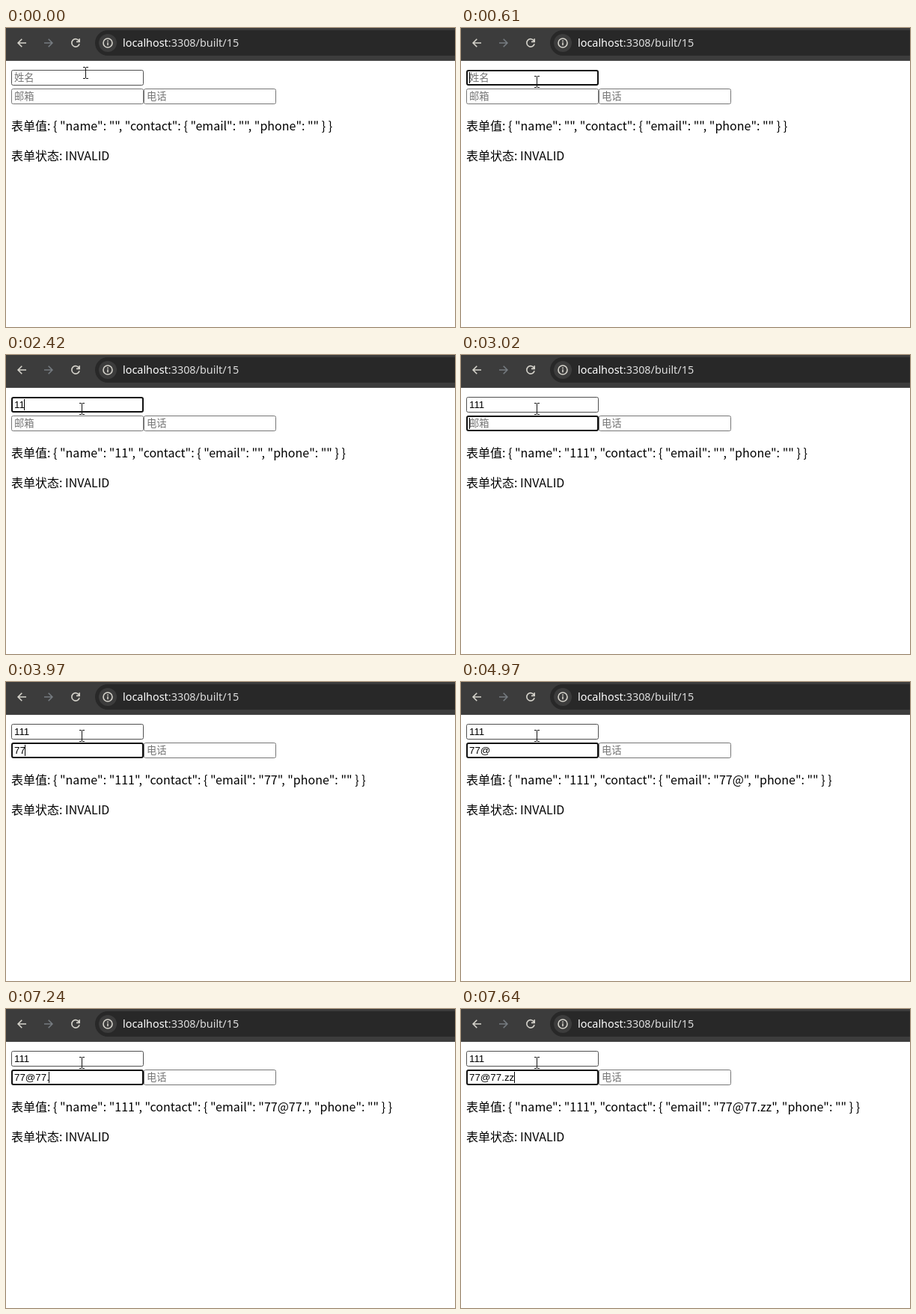
These frames come from a looping animation (600x400 px, 8000 ms). An HTML page:

```html
<!DOCTYPE html>
<html lang="en">
<head>
<meta charset="utf-8">
<title>表单</title>
<style>
  html, body { margin: 0; width: 100%; height: 100%; overflow: hidden; background: #fff; }
  svg { display: block; }
  text { font-kerning: normal; text-rendering: optimizeLegibility; }
  .url { font: 14.4px "Noto Sans", "Open Sans", sans-serif; fill: #dedede; }
  .url .host { fill: #fff; }
  .page { font: 16px "Noto Sans CJK SC", "Noto Sans CJK", sans-serif; fill: #000; }
  .value { font: 13.333px "Liberation Sans", Arial, "Noto Sans CJK SC", sans-serif; fill: #000; }
  .hint { font: 13.333px "Noto Sans CJK SC", "Noto Sans CJK", sans-serif; fill: #757575; }
  .icon { fill: none; stroke: #d5d3cb; stroke-width: 1.6; }
  .icon .dim { stroke: #757b80; }
</style>
</head>
<body>
<svg width="600" height="400" viewBox="0 0 600 400">
  <rect width="600" height="44" fill="#3c3c3c"/>
  <rect y="43" width="600" height="1" fill="#484848"/>
  <rect x="119" y="3" width="520" height="34" rx="17" fill="#282828"/>
  <circle cx="136" cy="20" r="12" fill="#3c3c3c"/>
  <g class="icon">
    <path d="M27 20H16.5M21.3 14.8L16.1 20l5.2 5.2"/>
    <path class="dim" d="M51 20h10.5M56.7 14.8l5.2 5.2-5.2 5.2"/>
    <path d="M97.6 17.3A5.2 5.2 0 1 0 98.1 21.2M98.2 14.2v4.2h-4.2"/>
    <circle cx="136" cy="20" r="6"/>
    <path d="M136 19.2v4M136 16.6v1.6"/>
  </g>
  <text class="url" x="156" y="25"><tspan class="host">localhost</tspan>:3308/built/15</text>

  <g id="fields"></g>
  <rect id="caret" width="1" height="15" fill="#000"/>
  <text id="json" class="page" x="7" y="137"></text>
  <text class="page" x="7" y="177">表单状态: INVALID</text>
  <path id="pointer" fill="none" stroke="#111" d="M103 52.5h3m1 0h3M106.5 53v14M103 67.5h3m1 0h3"/>
</svg>
<script>
const LOOP = 8000, BLINK = 535;
const byId = id => document.getElementById(id);

function setAttrs(node, attrs) {
  for (const key in attrs) node.setAttribute(key, attrs[key]);
  return node;
}

function add(parent, tag, attrs) {
  const node = document.createElementNS("http://www.w3.org/2000/svg", tag);
  return parent.appendChild(setAttrs(node, attrs));
}

function makeField(x, y, hint, border) {
  const group = byId("fields");
  return {
    x, y, hint, border,
    box: add(group, "rect", { fill: "#fff", rx: 2 }),
    text: add(group, "text", { x: x + 4, y: y + 15 })
  };
}

const fields = {
  name: makeField(7, 56, "姓名", "#4f4f4f"),
  email: makeField(7, 81, "邮箱", "#767676"),
  phone: makeField(184, 81, "电话", "#767676")
};

// Each entry: time, focused field, key typed.
const events = [
  [540, "name", ""], [2220, "name", "1"], [2420, "name", "1"], [2690, "name", "1"],
  [3020, "email", ""], [3760, "email", "7"], [3970, "email", "7"], [4430, "email", "@"],
  [5370, "email", "7"], [5510, "email", "7"], [6170, "email", "."],
  [7440, "email", "z"], [7640, "email", "z"]
];

function stateAt(t) {
  const state = { name: "", email: "", phone: "", focus: null, since: 0 };
  for (const [time, field, key] of events) {
    if (time > t) break;
    state[field] += key;
    state.focus = field;
    state.since = time;
  }
  return state;
}

function drawField(field, value, focused) {
  const inset = focused ? 1 : 0.5;
  setAttrs(field.box, {
    x: field.x + inset, y: field.y + inset,
    width: 177 - 2 * inset, height: 21 - 2 * inset,
    stroke: focused ? "#101010" : field.border,
    "stroke-width": 2 * inset
  });
  field.text.setAttribute("class", value ? "value" : "hint");
  field.text.textContent = value || field.hint;
}

function drawCaret(state, t) {
  const caret = byId("caret");
  const on = state.focus && Math.floor((t - state.since) / BLINK) % 2 === 0;
  caret.setAttribute("visibility", on ? "visible" : "hidden");
  if (!on) return;
  const field = fields[state.focus];
  const width = state[state.focus] ? field.text.getComputedTextLength() : 0;
  setAttrs(caret, { x: Math.floor(field.x + 4 + width), y: field.y + 3 });
}

function render(t) {
  const state = stateAt(t);
  for (const key in fields) drawField(fields[key], state[key], key === state.focus);
  drawCaret(state, t);

  byId("json").textContent = `表单值: { "name": "${state.name}", "contact": ` +
    `{ "email": "${state.email}", "phone": "${state.phone}" } }`;

  const step = Math.max(0, Math.min(4, Math.floor((t - 60) / 70)));
  byId("pointer").setAttribute("transform",
    `translate(${Math.round(-5 * step / 4)} ${3 * step})`);
}

const start = performance.now();
function tick() {
  render((performance.now() - start) % LOOP);
  requestAnimationFrame(tick);
}
tick();
</script>
</body>
</html>
```
